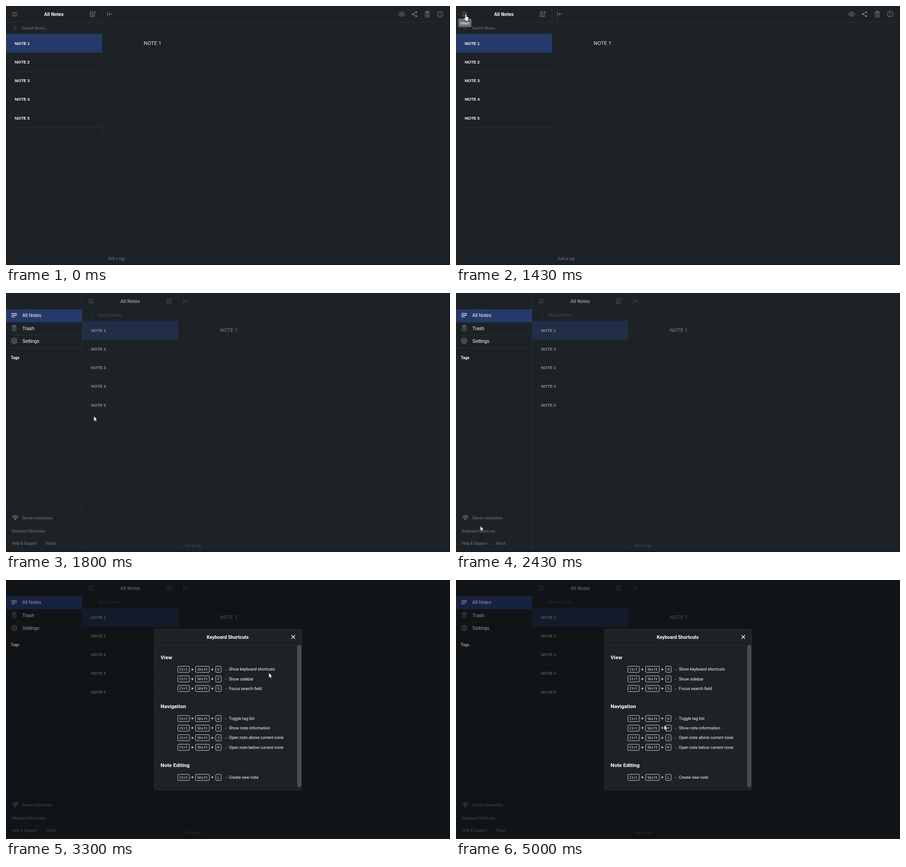
An HTML page for the animation above (5070 ms loop, 978x572 px).

```html
<!DOCTYPE html>
<html lang="en">
<head>
<meta charset="utf-8">
<title>Notes</title>
<style>
html, body { margin: 0; width: 100%; height: 100%; overflow: hidden; background: #1d2226; }
svg { display: block; }
#stage { width: 978px; height: 572px; font-family: Roboto, sans-serif; }
text { fill: #fff; white-space: pre; }
.ui { font-family: "Liberation Sans", sans-serif; }
.b { font-weight: 700; }
.mute { fill: #71767a; }
.low { fill: #777c80; }
.line { stroke: #2b3034; fill: none; }
.ico { fill: none; stroke: #777c80; stroke-width: 1.8; color: #777c80; }
.key { fill: none; stroke: #d5d7d8; }
.mono { font: 7.4px "DejaVu Sans Mono", monospace; text-anchor: middle; }

#slide, #app, #tip, #modal, #cursor, #arrow, #hand {
  animation: 5070ms linear infinite paused;
}
#slide { animation-name: slide; }
#app { animation-name: dim; }
#tip { animation-name: tip; opacity: 0; }
#modal { animation-name: modal; opacity: 0; }
#cursor { animation-name: move; }
#arrow { animation-name: arrow; animation-timing-function: step-end; }
#hand { animation-name: hand; animation-timing-function: step-end; }

@keyframes slide {
  0% { transform: translateX(0); }
  30.866% { transform: translateX(0); animation-timing-function: ease-in-out; }
  34.811%, 100% { transform: translateX(168px); }
}
@keyframes dim {
  0%, 30.866% { opacity: 1; }
  34.811%, 100% { opacity: .5; }
}
@keyframes tip {
  0%, 20.5% { opacity: 0; }
  21.6%, 30.8% { opacity: 1; }
  30.9%, 100% { opacity: 0; }
}
@keyframes modal {
  0%, 52.5% { opacity: 0; }
  52.51%, 100% { opacity: 1; }
}
@keyframes move {
  0%, 11.8% { transform: translate(100px, 80px); animation-timing-function: ease-out; }
  21%, 32.6% { transform: translate(21.5px, 18px); }
  35.4%, 36% { transform: translate(193.5px, 272px); }
  40.8%, 42% { transform: translate(106px, 466px); animation-timing-function: ease-out; }
  49.9%, 55.2% { transform: translate(48.5px, 519px); animation-timing-function: ease-in-out; }
  65.1% { transform: translate(579px, 205px); }
  68% { transform: translate(626px, 290px); }
  71% { transform: translate(562px, 370px); }
  74% { transform: translate(495px, 285px); }
  77.4%, 78.4% { transform: translate(550.5px, 188px); }
  81% { transform: translate(612px, 240px); }
  84% { transform: translate(565px, 319px); }
  86.8% { transform: translate(477px, 262px); }
  89.5% { transform: translate(487px, 170px); }
  97.2% { transform: translate(457px, 316px); }
  98.5%, 100% { transform: translate(458.7px, 320.5px); }
}
@keyframes arrow {
  0% { opacity: 0; }
  11.8% { opacity: 1; }
  20% { opacity: 0; }
  33% { opacity: 1; }
  48.5% { opacity: 0; }
  55.8%, 100% { opacity: 1; }
}
@keyframes hand {
  0% { opacity: 0; }
  20% { opacity: 1; }
  33% { opacity: 0; }
  48.5% { opacity: 1; }
  55.8%, 100% { opacity: 0; }
}
</style>
</head>
<body>
<svg id="stage" viewBox="0 0 978 572">
  <defs>
    <symbol id="menu" viewBox="0 0 24 24"><path d="M2.6 6.4h18.8M2.6 12h18.8M2.6 17.6h18.8"/></symbol>
    <symbol id="notes" viewBox="0 0 24 24"><path d="M2.6 6.4h18.8M2.6 12h18.8M2.6 17.6h12" stroke-width="2.2"/></symbol>
    <symbol id="new" viewBox="0 0 24 24"><path d="M14 4H5a1 1 0 0 0-1 1v15a1 1 0 0 0 1 1h12a1 1 0 0 0 1-1v-9M7 9h6M7 13h8M7 17h8M19 2v8M15 6h8"/></symbol>
    <symbol id="back" viewBox="0 0 24 24"><path d="M3.4 3.5v17M21.5 12H8M12 8l-4 4 4 4"/></symbol>
    <symbol id="eye" viewBox="0 0 24 24"><path d="M1.5 12C4 7 8 5 12 5s8 2 10.500 7C20 17 16 19 12 19S4 17 1.500 12z"/><circle cx="12" cy="12" r="3.4"/></symbol>
    <symbol id="share" viewBox="0 0 24 24"><path d="M18 5 6 12l12 7"/><g fill="currentColor" stroke="none"><circle cx="18" cy="5" r="3.3"/><circle cx="6" cy="12" r="3.3"/><circle cx="18" cy="19" r="3.3"/></g></symbol>
    <symbol id="trash" viewBox="0 0 24 24"><path d="M3.500 4.500h17M8.500 4V2h7v2M5.500 8v12a2 2 0 0 0 2 2h9a2 2 0 0 0 2-2V8zM9.200 12l5.600 5.600M14.800 12l-5.600 5.600"/></symbol>
    <symbol id="info" viewBox="0 0 24 24"><circle cx="12" cy="12" r="9.500"/><path d="M12 11v6.500M12 6.800v2"/></symbol>
    <symbol id="find" viewBox="0 0 24 24"><circle cx="9.500" cy="9.500" r="6"/><path d="m14 14 7 7"/></symbol>
    <symbol id="gear" viewBox="0 0 24 24"><path d="M10 2h4l.6 3 2 1.100 2.800-1 2 3.500-2.200 2v2.600l2.200 2-2 3.500-2.800-1-2 1.200-.6 3h-4l-.6-3-2-1.200-2.800 1-2-3.500 2.200-2v-2.600l-2.200-2 2-3.500 2.800 1 2-1.100z"/><circle cx="12" cy="12" r="3.400"/></symbol>
    <symbol id="wifi" viewBox="0 0 24 24"><path d="M1.800 9a14.500 14.500 0 0 1 20.400 0M5.500 13a9.300 9.300 0 0 1 13 0" stroke-width="2.400"/><path d="M8.300 15.900a5.300 5.300 0 0 1 7.400 0L12 19.700z" fill="currentColor" stroke="none"/></symbol>
  </defs>
  <rect width="978" height="572" fill="#1d2226"/>

  <g id="slide">
    <g id="side" transform="translate(-168)">
      <rect y="36" width="168" height="28.500" fill="#263a69"/>
      <path class="line" d="M11 93.500h156M0 121.500h167M0 473.500h167M167.500 0v572"/>
      <g class="ui" font-size="10.400">
        <text x="36" y="53.200">All Notes</text>
        <text x="36" y="81.700">Trash</text>
        <text x="36" y="110">Settings</text>
      </g>
      <text class="b" x="10.500" y="145.500" font-size="8.800">Tags</text>
      <g font-size="8.360">
        <text class="low" x="36" y="499.500">Server connection</text>
        <text class="low" x="13" y="529">Keyboard Shortcuts</text>
        <text class="low" x="13" y="556">Help &amp; Support</text>
        <text class="low" x="87" y="556">About</text>
      </g>
    </g>
    <g id="app">
      <rect y="61.500" width="211" height="41.500" fill="#263a69"/>
      <path class="line" d="M0 36H978M211.500 0V572"/>
      <text class="b" x="105.500" y="21.500" font-size="10.400" text-anchor="middle">All Notes</text>
      <text class="mute" x="35" y="51.500" font-size="8.500">Search Notes…</text>
      <text x="303.300" y="85.700" font-size="11.570" style="fill:#e4e5e6">NOTE 1</text>
      <text class="mute" x="224.300" y="560.700" font-size="8.700">Add a tag</text>
    </g>
  </g>

  <g id="tip">
    <rect x="5" y="28" width="29" height="18.500" rx="3" fill="#6d7072"/>
    <text class="ui" x="19.500" y="40.700" font-size="9" text-anchor="middle">Main</text>
  </g>

  <g id="modal">
    <rect width="978" height="572" opacity=".4"/>
    <rect x="326" y="108" width="326" height="357" rx="5" fill="#fff" opacity=".05"/>
    <rect x="327.500" y="109.500" width="323" height="354" rx="4" fill="#1d2226" stroke="#292e32"/>
    <path class="line" d="M328 143.500h322"/>
    <text class="b" x="488.500" y="130" font-size="10.400" text-anchor="middle">Keyboard Shortcuts</text>
    <path d="m628.700 121.700 8 8m0-8-8 8" stroke="#fff" stroke-width="1.400"/>
    <rect x="642.500" y="144.500" width="6.500" height="312" rx="3.250" fill="#43484c" stroke="#767a7d"/>
  </g>

  <path d="M977.200 0V572" stroke="#101315" stroke-width="1.600"/>
  <path d="M0 571.200H978" stroke="#14181a" stroke-width="1.600"/>

  <g id="cursor" fill="#fff" stroke="#15181a" stroke-width=".6">
    <path id="arrow" d="M0 0v11l2.500-2.300 1.600 3.700 1.700-.7-1.600-3.600H7.600z"/>
    <path id="hand" d="M-1.300 1.200a1.300 1.300 0 0 1 2.600 0V5.600l1.400.1 1.200.4 1.200.5c.8.4 1 .9.900 1.800l-.5 3.200-.8 1.700V15h-5.500v-1.500l-3.200-3.700c-.6-1.100.6-1.900 1.400-1.200l1.300 1.200z"/>
  </g>
</svg>
<script>
const $ = id => document.getElementById(id);
const add = (id, html) => $(id).insertAdjacentHTML('beforeend', html);
const icon = (name, x, y, style = '', size = 15.4) =>
  `<use class="ico" href="#${name}" x="${x - size / 2}" y="${y - size / 2}" width="${size}" height="${size}" style="${style}"/>`;

for (let i = 0; i < 5; i++) {
  const y = 82.3 + i * 41.2;
  add('app', `<text class="ui b" x="19.300" y="${y + 3.5}" font-size="9.100">NOTE ${i + 1}</text>`);
  if (i) add('app', `<path class="line" d="M19 ${Math.floor(y + 20.6) + .5}h192"/>`);
}
add('app', icon('menu', 19.3, 18) + icon('new', 191, 18) + icon('back', 229, 18) +
  icon('eye', 871.3, 18) + icon('share', 899.8, 18) + icon('trash', 928, 18) +
  icon('info', 956.3, 18) + icon('find', 20.5, 48.8, 'stroke:#5c6165', 11));
add('side', icon('notes', 18, 49, 'stroke:#fff') + icon('trash', 18, 77.5, '', 14) +
  icon('gear', 18, 105.7) + icon('wifi', 20.5, 496.5, '', 16));

const key = (x, w, y, label) =>
  `<rect class="key" x="${x}" y="${y - 7}" width="${w}" height="13.500" rx="2"/>
   <text class="mono" x="${x + w / 2}" y="${y + 2.4}">${label}</text>`;
const sections = [
  ['View', 174.6, 197.5, ['O Show keyboard shortcuts', 'F Show sidebar', 'S Focus search field']],
  ['Navigation', 283.3, 306.2, ['U Toggle tag list', 'Y Show note information',
    'J Open note above current none', 'K Open note below current none']],
  ['Note Editing', 413.2, 436.2, ['L Create new note']]
];
for (const [title, base, top, rows] of sections) {
  add('modal', `<text class="b" x="340.500" y="${base}" font-size="11.570">${title}</text>`);
  rows.forEach((row, i) => {
    const y = top + i * 21.2;
    add('modal', key(378.5, 25.5, y, 'Ctrl') + key(417.5, 30.5, y, 'Shift') + key(462, 12, y, row[0]) +
      `<g font-size="9"><text class="b" x="408" y="${y + 3}">+</text><text class="b" x="452" y="${y + 3}">+</text>
       <text x="483" y="${y + 3}">-</text><text x="491" y="${y + 2.8}">${row.slice(2)}</text></g>`);
  });
}

const LOOP = 5070, STEP = 1000 / 30;
const anims = document.getAnimations();
const start = performance.now();
function tick() {
  const t = (performance.now() - start) % LOOP;
  const now = Math.floor((t + 5) / STEP) * STEP;
  for (const a of anims) a.currentTime = Math.min(now, LOOP - 1);
  requestAnimationFrame(tick);
}
tick();
</script>
</body>
</html>
```
